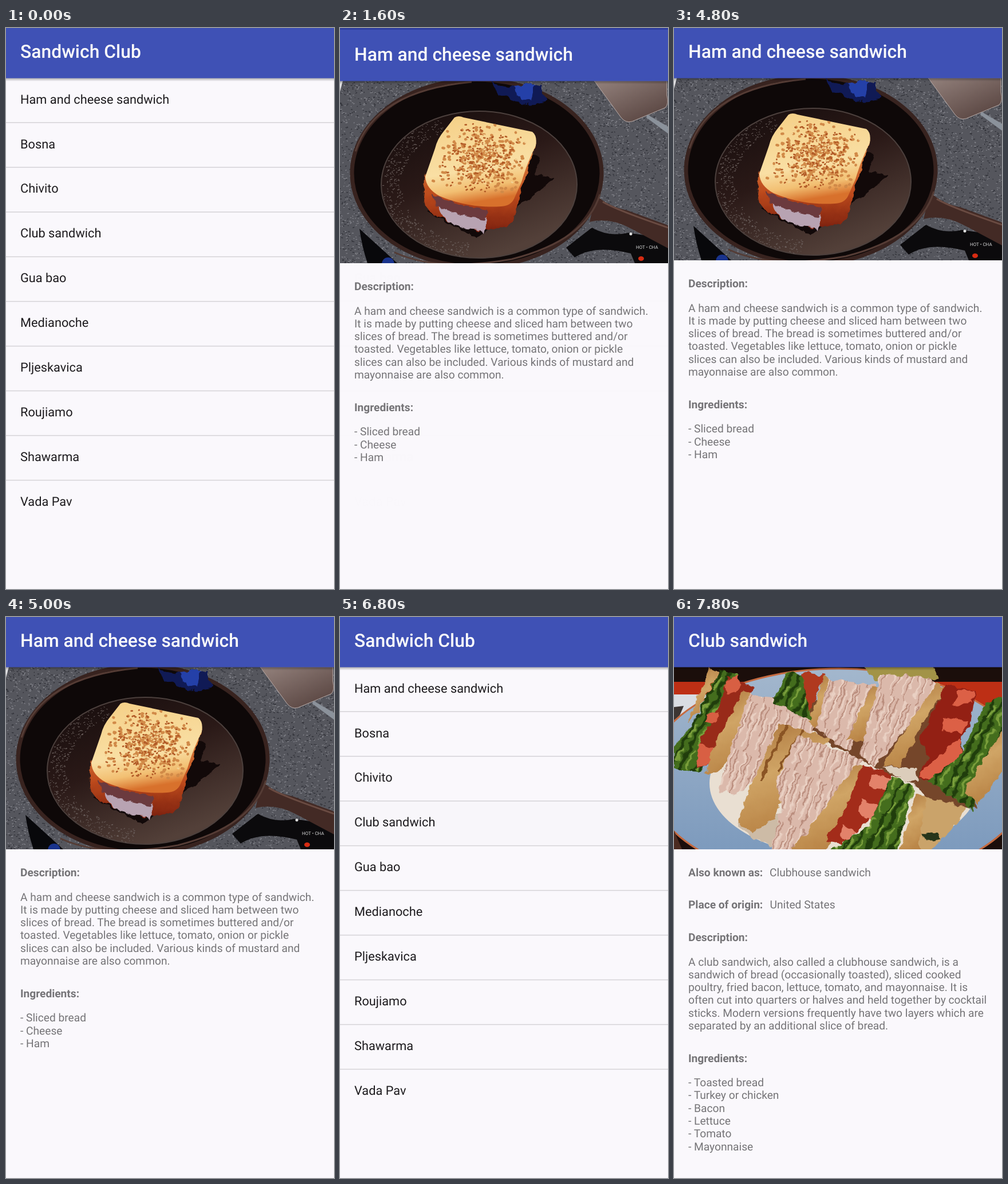
Write an HTML page that moves like this. It is 573 px wide and 978 px high and loops after 8 s.

```html
<!DOCTYPE html>
<html lang="en">
<head>
<meta charset="utf-8">
<title>Sandwich list</title>
<style>
  html, body { margin: 0; width: 100%; height: 100%; overflow: hidden; background: #faf8fc; }
  svg { display: block; width: 573px; height: 978px; overflow: hidden; }
  text { font-family: Roboto, "Open Sans", sans-serif; text-rendering: geometricPrecision; white-space: pre; }
  .title { font-size: 31.85px; font-weight: 500; fill: #fafafa; }
  .row { font-size: 21.75px; fill: #1d1b1e; }
  .body { font-size: 19.18px; fill: #757477; }
  .label { font-size: 19.15px; font-weight: 700; fill: #757477; }
  .specks { fill: none; stroke-linecap: round; }
</style>
</head>
<body>
<svg id="stage" viewBox="0 0 573 978">
  <defs>
    <clipPath id="photo"><rect y="87" width="573" height="318"/></clipPath>
    <clipPath id="toastClip"><use href="#slice"/></clipPath>
    <filter id="rough" filterUnits="userSpaceOnUse" x="-20" y="60" width="613" height="370" color-interpolation-filters="sRGB">
      <feTurbulence type="fractalNoise" baseFrequency=".07" numOctaves="2" seed="4"/>
      <feDisplacementMap in="SourceGraphic" scale="13" xChannelSelector="R" yChannelSelector="G"/>
      <feGaussianBlur stdDeviation=".7"/>
    </filter>
    <linearGradient id="shade" x2="0" y2="1">
      <stop stop-color="#000" stop-opacity=".32"/><stop offset="1" stop-color="#000" stop-opacity="0"/>
    </linearGradient>
    <linearGradient id="floor" x2=".55" y2="1">
      <stop stop-color="#150c0c"/><stop offset=".5" stop-color="#2a1917"/><stop offset="1" stop-color="#534039"/>
    </linearGradient>
    <linearGradient id="toast" x2=".2" y2="1">
      <stop stop-color="#f5cf86"/><stop offset=".65" stop-color="#f9dfa4"/><stop offset=".85" stop-color="#f2bf72"/><stop offset="1" stop-color="#d8712c"/>
    </linearGradient>
    <linearGradient id="crust" x2="0" y2="1">
      <stop stop-color="#df8a44"/><stop offset=".6" stop-color="#bd4a1c"/><stop offset="1" stop-color="#7d210f"/>
    </linearGradient>
    <linearGradient id="steel" x2=".8" y2="1">
      <stop stop-color="#94827d"/><stop offset="1" stop-color="#57433f"/>
    </linearGradient>
    <linearGradient id="plate" x2="0" y2="1">
      <stop stop-color="#a3b7cd"/><stop offset="1" stop-color="#7695ba"/>
    </linearGradient>
    <linearGradient id="bread" x2=".3" y2="1">
      <stop stop-color="#a87038"/><stop offset=".5" stop-color="#d0a566"/><stop offset="1" stop-color="#b98446"/>
    </linearGradient>
    <pattern id="meat" width="23" height="90" patternUnits="userSpaceOnUse" patternTransform="rotate(20)">
      <rect width="23" height="90" fill="#dbb9ab"/>
      <path d="M2 0V52M13 30V90M19 0V40" stroke="#b98c7c" stroke-width="2"/>
      <path d="M6 18V80M16 0V66" stroke="#ead1c4" stroke-width="3"/>
    </pattern>
    <pattern id="leaf" width="37" height="46" patternUnits="userSpaceOnUse" patternTransform="rotate(28)">
      <rect width="37" height="46" fill="#446d1d"/>
      <path d="M4 0Q14 22 4 46M24 0Q13 26 24 46" stroke="#203d0c" stroke-width="6" fill="none"/>
      <path d="M32 4Q24 24 34 40M13 10L10 34" stroke="#7a9f3b" stroke-width="4" fill="none"/>
    </pattern>

    <g id="panPhoto" clip-path="url(#photo)">
      <rect y="87" width="573" height="318" fill="#55565d"/>
      <g id="stove"></g>
      <path d="M0 87H5L0 106Z" fill="#e4e4e6"/>
      <path d="M34 345L100 405H48Q38 375 34 345Z" fill="#08080b"/>
      <path d="M395 378L440 343Q470 360 503 352L573 362V405H515L508 388Q445 372 410 395Z" fill="#0b0a0c"/>
      <path d="M444 87L491 151Q499 161 510 158L568 134Q575 128 571 112V87Z" fill="url(#steel)" stroke="#b8aaa6"/>
      <path d="M537 146L573 167V179L535 151Z" fill="#8b929b"/>
      <path d="M447 286Q468 306 502 313L573 339V379L505 343Q470 325 436 333Z" fill="#432a25"/>
      <path d="M459 298Q482 312 573 343" fill="none" stroke="#6a4b42" stroke-width="3"/>
      <ellipse cx="239" cy="248" rx="218" ry="163" fill="#0e0808" stroke="#38231f" stroke-width="7"/>
      <path d="M27 210Q60 105 230 89M95 386Q170 421 300 398Q430 365 454 285" fill="none" stroke="#553c35" stroke-width="3"/>
      <g filter="url(#rough)">
        <path d="M262 90Q302 104 348 92L362 123Q338 132 314 126Q286 120 262 90Z" fill="#101a55"/>
        <path d="M302 97L340 92L334 122L316 118Z" fill="#2440a8"/>
      </g>
      <ellipse cx="243" cy="268" rx="171" ry="128" fill="url(#floor)" stroke="#4c403d" stroke-width="2"/>
      <g id="grease"></g>
      <g filter="url(#rough)">
        <path d="M336 215L348 224L340 250L376 258L318 300L240 362L150 315Z" fill="#120909"/>
        <path d="M149 248L145 290Q148 314 170 324L240 348Q280 350 303 332L313 290L343 196Z" fill="url(#crust)"/>
        <path d="M170 300Q205 318 257 324L251 354L239 346L208 342L180 325Z" fill="#b8a3b2"/>
        <path d="M160 286Q210 306 258 312L254 329Q205 323 168 304Z" fill="#6b3a3e"/>
      </g>
      <path id="slice" d="M200 151Q207 147 216 151L336 176Q345 183 342 200Q326 232 317 264L304 293Q298 305 282 306Q226 310 174 288Q150 275 149 254L166 205Q170 188 182 174Z" fill="url(#toast)"/>
      <g id="browning" clip-path="url(#toastClip)"></g>
      <circle cx="84" cy="406" r="11" fill="#19338c"/>
      <ellipse cx="526" cy="397" rx="5" ry="4" fill="#d62b12"/>
      <circle cx="508" cy="354" r="2.5" fill="#ddd"/>
      <text x="517" y="380" font-size="8" fill="#d8d8d8">HOT • CHA</text>
    </g>

    <g id="clubPhoto" clip-path="url(#photo)">
      <rect y="87" width="573" height="318" fill="#1b0e0b"/>
      <path d="M0 113H573V175H0Z" fill="#bd2f15"/>
      <path d="M0 135H60V215H0Z" fill="#d9dce2"/>
      <path d="M0 157L17 155L8 176L0 183Z" fill="#3c3533"/>
      <ellipse cx="288" cy="278" rx="335" ry="188" fill="url(#plate)" stroke="#c56a40" stroke-width="3"/>
      <path d="M0 372L14 405H0Z" fill="#4b2b20"/>
      <ellipse cx="297" cy="290" rx="235" ry="128" fill="#e9dfd2"/>
      <g filter="url(#rough)">
        <path d="M110 360Q150 405 205 405L240 330Z" fill="#cdbba6"/>
        <path d="M325 80H452L462 108L352 112Z" fill="#a29347"/>
        <path d="M172 140L300 150L480 130L530 335L445 320L420 290L370 272L270 220Z" fill="#75462a"/>
        <path d="M362 262L420 264L428 288L400 284Z" fill="#dccdbb"/>

        <path d="M62 89L78 96L42 165L22 187Z" fill="url(#bread)"/>
        <path d="M82 89L114 102L66 190L50 272L0 263V225L32 188Z" fill="url(#leaf)"/>
        <path d="M95 105L142 123L86 202L62 258L38 262L47 212L75 160Z" fill="#982a19"/>
        <path d="M88 112L112 103L118 122L92 136ZM58 170L80 166L74 184L56 182ZM44 222L70 230L62 258L38 260Z" fill="#d85f43"/>
        <path d="M122 129L136 138L84 268L54 275L76 212Z" fill="url(#bread)"/>
        <path d="M132 135L176 142L252 190L150 275L110 310L78 304L96 236Z" fill="url(#meat)"/>
        <path d="M185 187L276 211L205 268L176 350L137 375L111 358L132 300Z" fill="url(#bread)"/>
        <path d="M196 190L150 285M225 198L180 270" fill="none" stroke="#8a5424" stroke-width="5"/>

        <path d="M196 96L235 100L240 182L174 150Z" fill="url(#leaf)"/>
        <path d="M224 96L264 102L236 165Z" fill="#b0391f"/>
        <path d="M262 104L276 109L252 196L236 184Z" fill="url(#bread)"/>
        <path d="M270 107L352 119L306 236L250 195Z" fill="url(#meat)"/>
        <path d="M345 121L361 128L330 216L302 215Z" fill="url(#bread)"/>

        <path d="M360 101L442 103L466 122L400 200L350 262L324 240L345 160Z" fill="url(#meat)"/>
        <path d="M460 114L474 124L432 190L394 262L364 261L392 214Z" fill="url(#bread)"/>
        <path d="M474 119L527 129L516 190L458 287L426 279L445 246L429 215Z" fill="#932014"/>
        <path d="M495 127L524 129L520 152L488 154ZM470 175L514 182L505 204L468 198ZM500 210L502 236L460 286L428 276Z" fill="#dc6046"/>
        <path d="M546 148L580 136V196L545 250L523 338L443 286L502 238Z" fill="url(#leaf)"/>
        <path d="M580 188V262L532 326L506 304Z" fill="url(#bread)"/>

        <path d="M216 208L330 248L270 325L210 415H168L188 332L178 288Z" fill="url(#meat)"/>
        <path d="M318 255L332 260L300 335L262 415H200L250 350Z" fill="url(#bread)"/>
        <path d="M330 258L380 274L360 330L300 395L264 390L300 335Z" fill="#a32c1a"/>
        <path d="M344 273L378 279L370 302L342 296ZM326 318L356 328L346 356L324 342ZM294 362L318 374L304 392L288 384Z" fill="#e3826a"/>
        <path d="M380 277L421 295L404 350L388 415H262L340 365Z" fill="url(#leaf)"/>
        <path d="M421 309L508 331L503 350L442 415H393Z" fill="#caa36a"/>
        <path d="M421 309L440 314L426 415H393Z" fill="url(#bread)"/>
        <path d="M432 376L460 377L466 388L446 392Z" fill="#26351a"/>
      </g>
    </g>
  </defs>
</svg>
<script>
const LOOP = 8000, STEP = 200, SLIDE = 81.5;
const LEFT = 25, LINE = 22.28, PITCH = 77.94;
const stage = document.getElementById('stage');

const text = (cls, y, s, x = LEFT) => `<text class="${cls}" x="${x}" y="${y}">${s}</text>`;
const lines = (y, list) => list.map((s, i) => text('body', Math.floor(y + i * LINE), s)).join('');
const header = title => `
  <rect y="87" width="573" height="6" fill="url(#shade)"/>
  <rect y="-40" width="573" height="39" fill="#303f9f"/>
  <rect y="-2" width="573" height="89.5" fill="#3f51b5"/>${text('title', 52, title)}`;
const screen = (id, content, title) => `<g id="${id}">
  <rect y="-40" width="573" height="1150" fill="#faf8fc"/>${content}${header(title)}</g>`;

const names = ['Ham and cheese sandwich', 'Bosna', 'Chivito', 'Club sandwich', 'Gua bao',
  'Medianoche', 'Pljeskavica', 'Roujiamo', 'Shawarma', 'Vada Pav'];
const rows = names.map((s, i) =>
  (i ? `<rect y="${86.2 + i * PITCH}" width="573" height="1.5" fill="#d5d3d7"/>` : '') +
  text('row', 131.6 + i * PITCH, s)).join('');

const ham = `<use href="#panPhoto"/>` +
  text('label', 452, 'Description:') +
  lines(495, ['A ham and cheese sandwich is a common type of sandwich.',
    'It is made by putting cheese and sliced ham between two',
    'slices of bread. The bread is sometimes buttered and/or',
    'toasted. Vegetables like lettuce, tomato, onion or pickle',
    'slices can also be included. Various kinds of mustard and',
    'mayonnaise are also common.']) +
  text('label', 663, 'Ingredients:') +
  lines(705.8, ['- Sliced bread', '- Cheese', '- Ham']);

const club = `<use href="#clubPhoto"/>` +
  text('label', 452, 'Also known as:') + text('body', 452, 'Clubhouse sandwich', 167) +
  text('label', 508, 'Place of origin:') + text('body', 508, 'United States', 167.5) +
  text('label', 565, 'Description:') +
  lines(608, ['A club sandwich, also called a clubhouse sandwich, is a',
    'sandwich of bread (occasionally toasted), sliced cooked',
    'poultry, fried bacon, lettuce, tomato, and mayonnaise. It is',
    'often cut into quarters or halves and held together by cocktail',
    'sticks. Modern versions frequently have two layers which are',
    'separated by an additional slice of bread.']) +
  text('label', 776, 'Ingredients:') +
  lines(818.65, ['- Toasted bread', '- Turkey or chicken', '- Bacon', '- Lettuce', '- Tomato', '- Mayonnaise']);

stage.insertAdjacentHTML('beforeend',
  screen('list', `<rect id="press" width="573" height="76"/>${rows}`, 'Sandwich Club') +
  screen('ham', ham, names[0]) + screen('club', club, names[3]));

// Seeded grain for the photo surfaces
let seed = 7;
const rnd = () => (seed = seed * 16807 % 2147483647) / 2147483647;
function specks(id, n, color, width, place) {
  let d = '';
  for (let i = 0; i < n; i++) {
    const [x, y] = place();
    d += `M${x.toFixed(1)} ${y.toFixed(1)}l${(rnd() * 2.5).toFixed(1)} ${(rnd() * 2 - 1).toFixed(1)}`;
  }
  document.getElementById(id).insertAdjacentHTML('beforeend',
    `<path class="specks" d="${d}" stroke="${color}" stroke-width="${width}"/>`);
}
const anywhere = () => [rnd() * 573, 87 + rnd() * 318];
const ring = () => {
  const a = 1.7 + rnd() * 2.6, r = 0.8 + rnd() * 0.19;
  return [243 + 171 * r * Math.cos(a), 268 + 128 * r * Math.sin(a)];
};
// Slanted patch that follows the face of the bread
const patch = () => {
  const u = rnd() + rnd() - 1, v = rnd() + rnd() - 1;
  return [248 + 78 * u - 18 * v, 222 + 14 * u + 62 * v];
};
specks('stove', 3400, '#85868d', 1.2, anywhere);
specks('stove', 3000, '#2f3037', 1.3, anywhere);
specks('grease', 420, '#6f6461', 1, ring);
specks('browning', 260, '#d18a48', 4.5, patch);
specks('browning', 230, '#b25a26', 2.6, patch);
specks('browning', 80, '#f3d294', 2.6, patch);

const visits = [
  { el: document.getElementById('ham'), row: 0, press: 1180, open: 1450, close: 4960 },
  { el: document.getElementById('club'), row: 3, press: 6780, open: 6952, close: LOOP }
];
const press = document.getElementById('press');
const unit = v => Math.min(1, Math.max(0, v));

function draw(t) {
  let touch = 0;
  for (const v of visits) {
    const age = t - v.open, left = t - v.close;
    const fadeIn = 1 - (1 - unit(age / 200)) ** 4;
    const fadeOut = 1 - unit((left - 100) / 150);
    const y = SLIDE * ((1 - unit(age / 350)) ** 5 + unit(left / 250) ** 4);
    v.el.setAttribute('transform', `translate(0 ${Math.round(y)})`);
    v.el.setAttribute('opacity', fadeIn * fadeOut);
    v.el.setAttribute('visibility', fadeIn * fadeOut ? 'visible' : 'hidden');
    if (t >= v.press && age < 400) {
      touch = 0.1 * unit((t - v.press) / 250);
      press.setAttribute('y', 87.5 + v.row * PITCH);
    }
  }
  press.setAttribute('opacity', touch);
}

const start = performance.now();
function tick(now) {
  const t = Math.max(0, now - start) % LOOP;
  draw(Math.floor(t / STEP) * STEP);
  requestAnimationFrame(tick);
}
draw(0);
requestAnimationFrame(tick);
</script>
</body>
</html>
```
